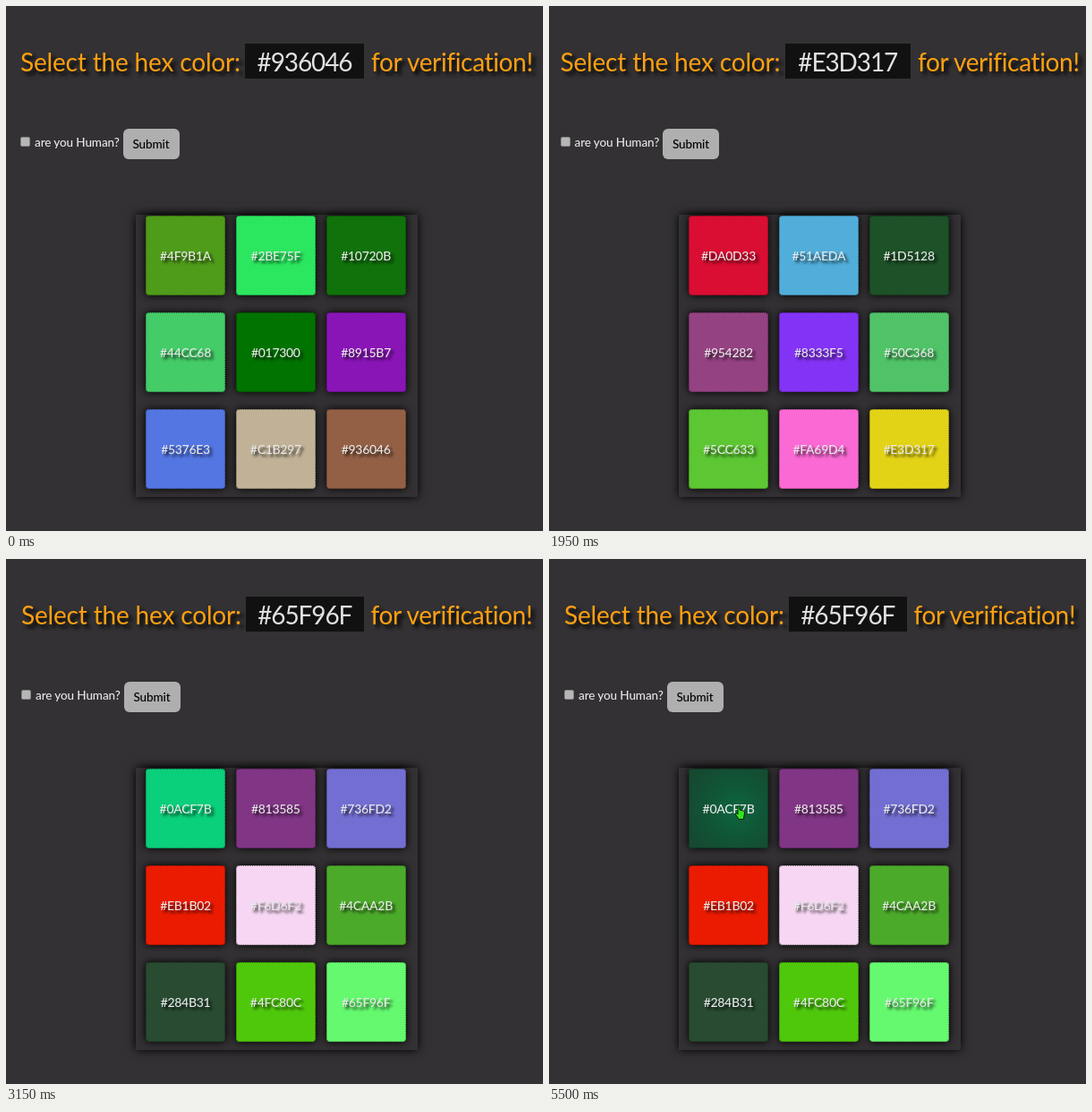
Recreate the animation shown at these times as an HTML page. Size 600 by 586 pixels, loop 5750 ms.

```html
<!DOCTYPE html>
<html lang="en">
<head>
<meta charset="utf-8">
<title>Hex color verification</title>
<style>
  html, body { margin: 0; width: 100%; height: 100%; overflow: hidden; background: #333133; }
  body { position: relative; font: 500 14px Lato, "Open Sans", sans-serif; color: #e8e8e8; }
  body * { position: absolute; box-sizing: border-box; white-space: nowrap; }
  .head { top: 42px; height: 39px; line-height: 40px; font-size: 28px; font-weight: 400; color: #ffa012; text-shadow: 4px 4px 4px #000; }
  #lead { letter-spacing: -.17px; }
  #tail { letter-spacing: -.35px; }
  #code { background: #111; color: #e2e2e2; text-align: center; letter-spacing: -1.1px; text-shadow: none; }
  #row { left: 0; top: 137px; height: 34px; font-size: 13.5px; }
  #check { left: .2px; top: 9px; width: 11px; height: 11px; border: 1px solid #858585; border-radius: 2px; background: #b6b6b6; }
  #ask { left: 16px; top: 0; line-height: 31px; letter-spacing: -.1px; }
  #submit { left: 114.5px; top: 0; width: 63px; height: 34px; line-height: 35px; border-radius: 6px; background: #afafaf; color: #000; text-align: center; letter-spacing: -.1px; }
  #panel { left: 145px; top: 233px; width: 315px; height: 315px; background: #333133; box-shadow: 0 0 10px #000; }
  .tile, #glow { border: 1px dotted rgba(0, 0, 0, .5); border-radius: 4px; }
  .tile { width: 89px; height: 89px; box-shadow: 0 0 10px #000; }
  .tile span { inset: 0; line-height: 87px; text-align: center; letter-spacing: -.3px; text-shadow: 3px 3px 3px rgba(0, 0, 0, .75); }
  #glow { inset: -1px; background: radial-gradient(circle at 60% 52%, #0e663f, #105536 45%, #17482f 90%) border-box; }
  #mouse { left: 0; top: 0; width: 20px; height: 20px; overflow: visible; }
  #mouse path { fill: #35e01d; stroke: #06200a; stroke-width: 1; stroke-linejoin: round; }
</style>
</head>
<body>
<div class="head" id="lead">Select the hex color:</div>
<div class="head" id="code"></div>
<div class="head" id="tail">for verification!</div>
<div id="row">
  <div id="check"></div>
  <div id="ask">are you Human?</div>
  <div id="submit">Submit</div>
</div>
<div id="panel"></div>
<svg id="mouse">
  <path id="arrow" d="M.5 .5V12L3.2 9.5L5.2 14L7.3 13L5.4 8.8H9Z"/>
  <path id="hand" d="M3 1Q4.5 -.3 5 1.5V5L9.5 6.2Q10.8 6.8 10.5 9L9.3 15.5H4.2L.7 10.5Q-.2 8.8 1.3 8.8L3 10Z"/>
</svg>
<script>
const LOOP = 5750, STEP = 50;

// start time, left and width of the code box, tile colors (the last is the answer)
const rounds = [
  [0, 267, 133, "4F9B1A 2BE75F 10720B 44CC68 017300 8915B7 5376E3 C1B297 936046"],
  [1200, 263.5, 140.5, "DA0D33 51AEDA 1D5128 954282 8333F5 50C368 5CC633 FA69D4 E3D317"],
  [2000, 264.8, 138, "9EC4BD 1D4249 821713 D9053E DF8067 4E5C60 236C69 4E5E3C A36001"],
  [3000, 268, 131.5, "0ACF7B 813585 736FD2 EB1B02 F6D6F2 4CAA2B 284B31 4FC80C 65F96F"]
].map(([start, x, w, list]) => ({ start, x, w, colors: list.split(" ").map(c => "#" + c) }));

// pointer tip: time, x, y
const path = [
  [3500, 96, 22], [3600, 62, 70], [3700, 26, 128], [3800, 10, 158],
  [3900, 9, 159], [4050, 17, 148], [4400, 19, 150], [4500, 62, 162],
  [4600, 128, 164], [4650, 154, 163], [4700, 160, 161], [5100, 160, 161],
  [5150, 168, 172], [5250, 222, 212], [5350, 256, 256], [5400, 243, 270],
  [5450, 224, 276], [5500, 208, 275], [LOOP, 208, 275]
];
const HOVER = 5400, HOVERED = 5500;

const $ = id => document.getElementById(id);

function add(parent, tag, props = {}) {
  const el = Object.assign(document.createElement(tag), props);
  return parent.appendChild(el);
}

const tiles = Array.from({ length: 9 }, (_, i) => {
  const el = add($("panel"), "div", { className: "tile" });
  el.style.left = 11 + (i % 3) * 100.8 + "px";
  el.style.top = 1.3 + Math.floor(i / 3) * 108 + "px";
  const glow = i ? null : add(el, "div", { id: "glow" });
  return { el, glow, label: add(el, "span") };
});

function tipAt(t) {
  const i = path.findIndex(p => p[0] > t);
  const [t0, x0, y0] = path[i - 1], [t1, x1, y1] = path[i];
  const k = (t - t0) / (t1 - t0);
  return [x0 + (x1 - x0) * k, y0 + (y1 - y0) * k];
}

let shown;
function showRound(round) {
  if (round === shown) return;
  shown = round;
  const { x, w, colors } = round;
  $("lead").style.left = $("row").style.left = x - 251 + "px";
  $("code").style.left = x + "px";
  $("code").style.width = w + "px";
  $("tail").style.left = x + w + 8 + "px";
  $("code").textContent = colors[8];
  tiles.forEach(({ el, label }, i) => {
    el.style.backgroundColor = colors[i];
    label.textContent = colors[i];
  });
}

function draw(t) {
  showRound(rounds.findLast(r => t >= r.start));

  const over = t >= HOVER;
  const k = Math.min(1, Math.max(0, (t - HOVER + STEP) / (HOVERED - HOVER + STEP)));
  tiles[0].glow.style.opacity = k;
  tiles[0].label.style.textShadow = over ? "none" : "";

  const visible = t >= path[0][0];
  $("mouse").style.display = visible ? "" : "none";
  $("arrow").style.display = over ? "none" : "";
  $("hand").style.display = over ? "" : "none";
  if (visible) {
    const [x, y] = tipAt(t).map(Math.round);
    $("mouse").style.transform = `translate(${x}px, ${y}px)`;
  }
}

const begin = performance.now();
function tick() {
  const t = (performance.now() - begin) % LOOP;
  draw(Math.floor(t / STEP) * STEP);
  requestAnimationFrame(tick);
}
tick();
</script>
</body>
</html>
```
